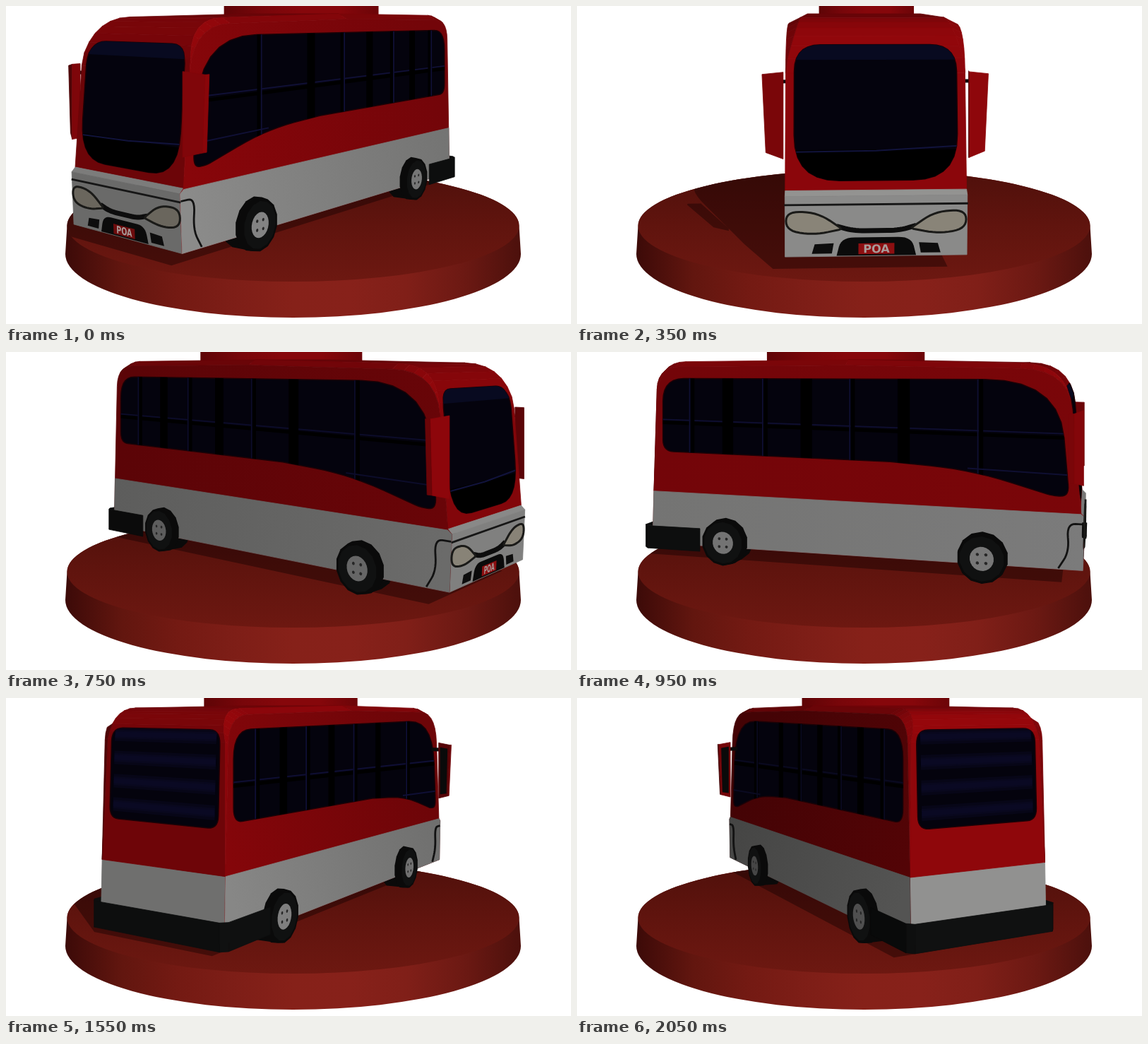
Write an HTML page with a canvas that moves like this. It is 800 px wide and 450 px high and loops after 2100 ms.

```html
<!DOCTYPE html>
<html lang="en">
<head>
<meta charset="utf-8">
<title>Bus turntable</title>
<style>
  html, body { margin: 0; width: 100%; height: 100%; overflow: hidden; background: #fff; }
  canvas { display: block; width: 800px; height: 450px; }
</style>
</head>
<body>
<canvas id="stage" width="800" height="450"></canvas>
<script>
const ctx = document.getElementById('stage').getContext('2d');
const LOOP = 2100, STEP = 50;
const FIRST_ANGLE = -39.8, STEP_ANGLE = 6.04; // degrees, 0 faces the viewer
const AXIS = 406.5, HORIZON = 10, DIST = 1177, EYE = 280;
const RED = [131, 6, 10], WHITE = [133, 133, 132], BLACK = [15, 16, 16];
const GLASS = '#04030d', NAVY = [17, 17, 58], INK = '#0a0a0a', RIM = '#1c0206';
const AXLES = [178, -172], SIDES = [-1, 1], BELT = 96;

let sin = 0, cos = 1;

// ---- geometry: bus points are [along, right, up] ----

// polygon with curved corners; each point is [x, y, radius]
function rounded(pts) {
  return pts.flatMap(([x, y, r], i) => {
    if (!r) return [[x, y]];
    const toward = ([px, py]) => {
      const k = Math.min(.5, r / Math.hypot(px - x, py - y));
      return [x + (px - x) * k, y + (py - y) * k];
    };
    const a = toward(pts.at(i - 1)), b = toward(pts[(i + 1) % pts.length]);
    return Array.from({ length: 8 }, (_, j) => {
      const t = j / 7, u = 1 - t;
      return [0, 1].map(c => u * u * a[c] + 2 * u * t * [x, y][c] + t * t * b[c]);
    });
  });
}

const box = (w, lo, hi, rLo, rHi) =>
  rounded([[-w, lo, rLo], [-w, hi, rHi], [w, hi, rHi], [w, lo, rLo]]);

// up the rear, over the roof, down the front
const PROFILE = rounded([[-281, 24], [-279, BELT], [-273, 276, 36], [0, 279], [284, 274, 58],
  [298, 93], [303, 88], [300, 24]]);
const SIDE_WINDOW = rounded([[-265, 152, 16], [-265, 253, 32], [272, 255, 90], [284, 113, 14],
  [264, 113, 8], [165, 141, 60], [60, 148]]);

const half = s => 94 + s * .007;
const turn = (s, r) => [s * sin - r * cos, -s * cos - r * sin];

function toScreen(x, z, y) {
  const k = DIST / (DIST + z);
  return [AXIS + x * k, HORIZON + (EYE - y) * k];
}
const project = ([s, r, y]) => toScreen(...turn(s, r), y);

function facing([ns, nr, ny], [s, r, y]) {
  const [nx, nz] = turn(ns, nr), [x, z] = turn(s, r);
  return -nx * x + ny * (EYE - y) - nz * (DIST + z) > 0;
}
const sideSeen = k => facing([0, k, 0], [0, k * 94, 0]);

// position of the front (dir 1) or rear (dir -1) skin at a height
function skin(y, dir) {
  let best = -Infinity;
  for (let i = 1; i < PROFILE.length; i++) {
    const [s0, y0] = PROFILE[i - 1], [s1, y1] = PROFILE[i];
    if ((y - y0) * (y - y1) <= 0 && y0 !== y1) {
      best = Math.max(best, dir * (s0 + (s1 - s0) * (y - y0) / (y1 - y0)));
    }
  }
  return dir * best;
}

function hull(pts) {
  const sorted = pts.slice().sort((a, b) => a[0] - b[0] || a[1] - b[1]);
  const chain = list => {
    const out = [];
    for (const p of list) {
      while (out.length > 1) {
        const [a, b] = out.slice(-2);
        if ((b[0] - a[0]) * (p[1] - a[1]) - (b[1] - a[1]) * (p[0] - a[0]) > 0) break;
        out.pop();
      }
      out.push(p);
    }
    return out.slice(0, -1);
  };
  return [...chain(sorted), ...chain(sorted.reverse())];
}

// ---- painting ----

// lambert light with a little falloff into the depth
function shade(color, [ns, nr, ny], [s, r] = [0, 0]) {
  const [x, z] = turn(ns, nr), len = Math.hypot(ns, nr, ny);
  const lit = .55 + .48 * Math.max(0, (.38 * x + .48 * ny - .79 * z) / len);
  const k = lit * (1 - turn(s, r)[1] / 2500);
  return `rgb(${color.map(c => Math.round(c * k))})`;
}

function gradient(x0, y0, x1, y1, colors) {
  const g = ctx.createLinearGradient(x0, y0, x1, y1);
  colors.forEach((c, i) => g.addColorStop(i / (colors.length - 1), c));
  return g;
}

function paint(spots, color) {
  ctx.beginPath();
  spots.forEach(p => ctx.lineTo(...p));
  ctx.closePath();
  ctx.fillStyle = color;
  ctx.fill();
}
const fill = (pts, color) => paint(pts.map(project), color);

function edge(color, width) {
  ctx.strokeStyle = color;
  ctx.lineWidth = width;
  ctx.stroke();
}

// a lit face; its outline hides the seams
function face(pts, color, normal, span) {
  if (!facing(normal, pts[0])) return;
  const c = span
    ? gradient(...project(span[0]), ...project(span[1]), span.map(p => shade(color, normal, p)))
    : shade(color, normal, pts[0]);
  fill(pts, c);
  edge(c, .8);
}

function line(pts, color, width) {
  ctx.beginPath();
  pts.map(project).forEach(p => ctx.lineTo(...p));
  edge(color, width);
}

// window glass; detail is clipped to it
function glass(pts, detail) {
  ctx.save();
  fill(pts, GLASS);
  edge(RIM, 1.5);
  ctx.clip();
  detail();
  ctx.restore();
}

// ---- stand ----

function discTop() {
  ctx.beginPath();
  ctx.ellipse(AXIS, 311, 320, 79, 0, 0, 7);
}

function drawDisc() {
  ctx.beginPath();
  ctx.ellipse(AXIS, 311, 320, 79, 0, Math.PI, 0);
  ctx.ellipse(AXIS, 351, 322.5, 90, 0, 0, Math.PI);
  ctx.closePath();
  ctx.fillStyle = gradient(84, 0, 729, 0,
    ['#3c0a08', '#62160f', '#741a13', '#7e1e17', '#862119', '#87211a', '#801f18', '#6c1913', '#4c100c']);
  ctx.fill();
  discTop();
  ctx.fillStyle = gradient(0, 232, 0, 390, ['#4f100b', '#60140e', '#6d1811']);
  ctx.fill();
}

function drawShadows() {
  const layer = new Path2D();
  const add = pts => {
    const spots = hull(pts.map(([s, r, y]) => {
      const [x, z] = turn(s, r);
      return toScreen(x - y * .7, z + y * 1.55, 0);
    }));
    spots.forEach((p, i) => i ? layer.lineTo(...p) : layer.moveTo(...p));
    layer.closePath();
  };
  add(SIDES.flatMap(k => PROFILE.map(([s, y]) => [s, k * half(s), y])));
  for (const k of SIDES) add([...mirrorRing(k, 0), ...mirrorRing(k, 1)]);
  ctx.save();
  discTop();
  ctx.clip();
  ctx.fillStyle = 'rgba(18,0,0,.42)';
  ctx.fill(layer);
  ctx.restore();
}

// ---- parts ----

function circle(s, r, radius, sides = 14, y = 31) {
  return Array.from({ length: sides }, (_, i) => {
    const a = (i + .5) * 2 * Math.PI / sides;
    return [s + radius * Math.cos(a), r, y + radius * Math.sin(a)];
  });
}

const tire = (s, r0, r1) =>
  paint(hull([...circle(s, r0, 32), ...circle(s, r1, 31)].map(project)), INK);

function drawWheel(s, k) {
  tire(s, k * 88, k * 98);
  fill(circle(s, k * 98, 28), '#101111');
  fill(circle(s, k * 98, 15, 24), shade([130, 130, 130], [0, k, 0], [s, k * 98]));
  for (let a = Math.PI / 4; a < 6; a += Math.PI / 2) {
    fill(circle(s + 7.5 * Math.cos(a), k * 98, 2, 8, 31 + 7.5 * Math.sin(a)), '#262626');
  }
}

function drawRoofUnit() {
  const corners = [75, -122].flatMap(s => SIDES.flatMap(k => [[s, k * 63, 276], [s, k * 63, 320]]));
  const spots = hull(corners.map(project)), xs = spots.map(p => p[0]);
  paint(spots, gradient(Math.min(...xs), 0, Math.max(...xs), 0,
    ['#5e0406', '#78060a', '#86070b', '#86070b', '#6c0508']));
}

const MIRROR = [[301, 98], [290, 121], [284, 121], [288, 100]];
function mirrorRing(k, top) {
  return MIRROR.map(([s, r]) => {
    const outer = r > 110;
    return [s, k * (outer && !top ? r - 4 : r), top ? 218 - outer * 3 : 127 + outer * 5];
  });
}

function drawMirror(k) {
  const lo = mirrorRing(k, 0), hi = mirrorRing(k, 1);
  line([[286, k * 88, 207], [286, k * 104, 207]], INK, 5);
  MIRROR.forEach(([s, r], i) => {
    const j = (i + 1) % 4, [s2, r2] = MIRROR[j];
    face([lo[i], lo[j], hi[j], hi[i]], RED, [r2 - r, k * (s - s2), 0]);
  });
  if (facing([-1, 0, 0], lo[2])) {
    fill([[104, 134], [115, 136], [117, 209], [104, 211]].map(([r, y]) => [284, k * r, y]), INK);
  }
}

const BUMPER = [[-205, 100], [-284, 100], [-291, 93], [-291, -93], [-284, -100], [-205, -100]];
function drawBumper() {
  for (let i = 1; i < BUMPER.length; i++) {
    const [s, r] = BUMPER[i - 1], [s2, r2] = BUMPER[i];
    face([[s, r, 18], [s2, r2, 18], [s2, r2, 49], [s, r, 49]], BLACK, [r2 - r, s - s2, 0]);
  }
}

function drawSide(k) {
  const many = pts => pts.map(([s, y]) => [s, k * (half(s) + .2), y]);
  const normal = [0, k, 0], span = many([[-280, 100], [300, 100]]);
  face(many([[-281, 24], [-279, BELT], [298, 92], [303, 88], [300, 24]]), WHITE, normal, span);

  glass(many(SIDE_WINDOW), () => {
    const blue = shade(NAVY, normal);
    const bar = (s, color, width) => line(many([[s, 110], [s, 256]]), color, width);
    line(many([[-266, 192], [285, 184]]), '#000', 5);
    line(many([[-266, 196], [285, 189]]), blue, 1.8);
    for (const s of [-167, -54, 78]) {
      fill(many([[s - 8, 140], [s + 8, 140], [s + 8, 256], [s - 8, 256]]), '#000');
    }
    for (const s of [-224, -116, 6, 173]) {
      bar(s + 4, '#000', 6);
      bar(s, blue, 1.8);
    }
    line(many([[160, 143], [284, 139]]), blue, 2);
  });

  line(many(rounded([[271, 25], [284, 46, 16], [281, 80, 22], [302, 80]])), '#121212', 2.8);
  for (const s of AXLES) drawWheel(s, k);
}

function drawFront() {
  const many = pts => pts.map(([q, y]) => [skin(y, 1) + .2, -q, y]);
  const band = (lo, hi, color) => fill(many([[-95, lo], [95, lo], [95, hi], [-95, hi]]), color);

  const shield = rounded([[-87, 103, 48], [-87, 246, 28], [87, 246, 28], [87, 103, 48]]);
  glass(many(shield), () => {
    band(230, 250, '#080a20');
    band(95, 135, '#000');
    line(many([[-95, 133], [0, 134], [95, 139]]), '#11133c', 2);
  });

  line(many([[-97, 79], [97, 79]]), '#161616', 2.8);
  line(many(rounded([[-42, 56], [-24, 51, 12], [24, 51, 12], [42, 56]])), '#0d0d0d', 7);
  const lamp = rounded([[95, 72, 14], [62, 71, 16], [36, 53, 4], [66, 47, 18], [95, 52, 14]]);
  for (const k of SIDES) {
    const flip = pts => many(pts.map(([q, y]) => [q * k, y]));
    fill(flip(lamp), shade([146, 141, 128], [1, 0, 0]));
    edge('#1a1a18', 3);
    fill(flip([[68, 27], [65, 37], [45, 38], [47, 27]]), '#0d0d0d');
  }
  fill(many(rounded([[-42, 24.5], [-37, 44, 14], [37, 44, 14], [42, 24.5]])), '#0b0b0b');
  drawPlate(many([[-19, 37.5], [19, 37.5], [19, 26], [-19, 26]]));
}

function drawPlate(corners) {
  fill(corners, shade([150, 16, 18], [1, 0, 0]));
  const [o, x, , y] = corners.map(project);
  ctx.save();
  ctx.transform((x[0] - o[0]) / 38, (x[1] - o[1]) / 38, (y[0] - o[0]) / 11.5, (y[1] - o[1]) / 11.5, ...o);
  ctx.font = 'bold 12px "DejaVu Sans", sans-serif';
  ctx.textAlign = 'center';
  ctx.fillStyle = '#a89c9a';
  ctx.fillText('POA', 19, 10.1);
  ctx.restore();
}

function drawRear() {
  const many = pts => pts.map(([r, y]) => [skin(y, -1) - .2, r, y]);
  glass(many(box(81, 146, 253, 14, 16)), () => {
    for (let y = 163; y < 250; y += 27.5) {
      for (const h of [8, 5, 3]) {
        fill(many([[-76, y - h], [76, y - h], [76, y + h], [-76, y + h]]), 'rgba(12,12,44,.35)');
      }
    }
  });
}

function drawBody() {
  const ease = y => Math.min(1, Math.max(0, (y - 225) / 53));
  const outer = ([s, y], k) => [s, k * half(s), y - 7 * ease(y)];
  const inner = ([s, y], k) => [s, k * (half(s) - 14 * ease(y)), y];

  for (let i = 1; i < PROFILE.length; i++) {
    const a = PROFILE[i - 1], b = PROFILE[i], top = Math.max(a[1], b[1]);
    const len = Math.hypot(a[0] - b[0], a[1] - b[1]);
    const ns = (a[1] - b[1]) / len, ny = (b[0] - a[0]) / len;
    face([inner(a, -1), inner(b, -1), inner(b, 1), inner(a, 1)], top < 98 ? WHITE : RED, [ns, 0, ny]);
    if (top < 225) continue;
    for (const k of SIDES) {
      face([outer(a, k), outer(b, k), inner(b, k), inner(a, k)], RED, [ns, k * .9, ny]);
    }
  }
  for (const k of SIDES.filter(sideSeen)) {
    face(PROFILE.map(p => outer(p, k)), RED, [0, k, 0], [[-280, k * 94, 100], [300, k * 94, 100]]);
    drawSide(k);
  }
  if (facing([1, 0, 0], [298, 0, 120])) drawFront();
  if (facing([-1, 0, 0], [-278, 0, 120])) drawRear();
}

function draw(time) {
  const step = Math.floor((time % LOOP) / STEP);
  const angle = (FIRST_ANGLE + STEP_ANGLE * step) * Math.PI / 180;
  sin = Math.sin(angle);
  cos = Math.cos(angle);
  ctx.fillStyle = '#fff';
  ctx.fillRect(0, 0, 800, 450);
  drawDisc();
  drawShadows();
  for (const k of SIDES) for (const s of AXLES) tire(s, k * 66, k * 96);
  face(BUMPER.map(([s, r]) => [s, r, 49]), BLACK, [0, 0, 1]);
  drawRoofUnit();
  SIDES.filter(k => !sideSeen(k)).forEach(drawMirror);
  drawBody();
  drawBumper();
  SIDES.filter(sideSeen).forEach(drawMirror);
}

const start = performance.now();
function tick() {
  draw(performance.now() - start);
  requestAnimationFrame(tick);
}
tick();
</script>
</body>
</html>
```
